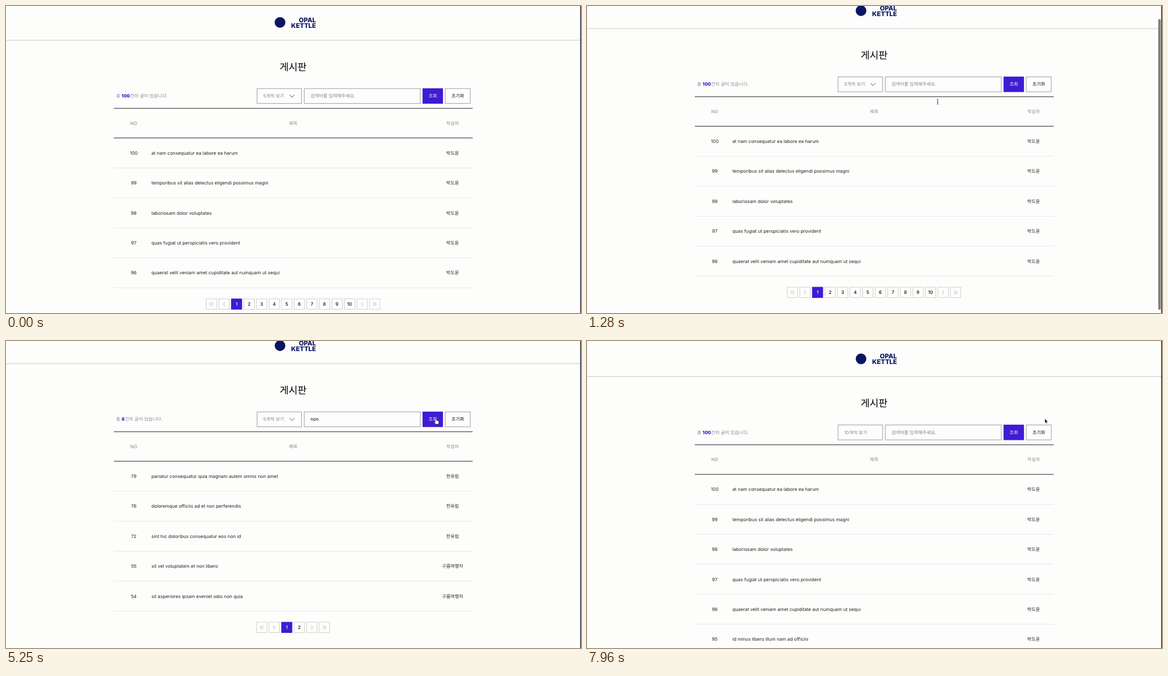
An HTML page that plays this animation: 1024x547 px, repeating every 7990 ms.

```html
<!DOCTYPE html>
<html lang="ko">
<head>
<meta charset="utf-8">
<title>게시판</title>
<style>
html, body { margin: 0; width: 100%; height: 100%; overflow: hidden; background: #fdfdfc; }
svg { display: block; width: 100vw; height: 100vh; }
text { font: 400 8.2px Inter, "Noto Sans CJK KR", "Noto Sans CJK JP", sans-serif; fill: #222; text-rendering: geometricPrecision; white-space: pre; }
.mid { text-anchor: middle; }
.end { text-anchor: end; }
.grey { fill: #888; }
.dark { fill: #111; font-weight: 500; }
.white { fill: #fff; font-weight: 500; }
.title { font-size: 17.5px; fill: #000; }
.brand { font-size: 11.4px; font-weight: 800; fill: #0a1760; }
.count { font-weight: 800; fill: #3f1bd4; }
.author { font-weight: 500; }
.box { fill: none; stroke: #9c9ca2; stroke-width: 1; }
.pager { fill: none; stroke: #cfcfcf; stroke-width: 1; }
.fill { fill: #3f1bd4; }
.rule { fill: #5c5c5c; }
.thin { fill: #e7e7ec; }
.chevron { fill: none; stroke: #858585; stroke-width: 1.1; }
.arrow { fill: none; stroke: #aaa; stroke-width: 0.9; }
</style>
</head>
<body>
<svg viewBox="0 0 1024 547">
  <rect width="1024" height="547" fill="#fdfdfc"/>
  <g id="page">
    <circle cx="488" cy="31.7" r="9.5" fill="#0a1760"/>
    <text class="brand end" x="552" y="31">OPAL</text>
    <text class="brand end" x="552" y="41.2">KETTLE</text>
    <rect y="63" width="1024" height="1" fill="#c9c9cc"/>
    <text class="title mid" x="511.3" y="117.2">게시판</text>
    <text class="grey" x="196" y="165.7">총 <tspan class="count" id="count"></tspan>건의 글이 있습니다.</text>
    <rect class="box" x="447.1" y="149.6" width="79.2" height="26.6"/>
    <text class="grey" id="size" x="458" y="165.7"></text>
    <path class="chevron" id="chevron" d="M504.8 160.7l4.4 4.4 4.4-4.4"/>
    <rect class="box" id="input" x="531.2" y="149.6" width="206.6" height="26.6"/>
    <text id="query" y="165.7"></text>
    <rect id="caret" y="157.8" width="0.9" height="10" fill="#111"/>
    <rect class="fill" x="741.8" y="149.1" width="36.4" height="27.5"/>
    <text class="white mid" x="760" y="165.7">조회</text>
    <rect class="box" x="782.2" y="149.6" width="44.6" height="26.6"/>
    <text class="dark mid" x="804.5" y="165.7">초기화</text>
    <rect class="rule" x="192" y="184.2" width="639" height="1.4"/>
    <rect class="rule" x="192" y="236.9" width="639" height="1.4"/>
    <text class="grey mid" x="227.5" y="214.2">NO</text>
    <text class="grey mid" x="511.3" y="214.2">제목</text>
    <text class="grey mid" x="795.2" y="214.2">작성자</text>
    <g id="list"></g>
  </g>
  <rect id="thumb" x="1017.3" width="4.4" height="518" rx="2.2" fill="#7f7f7f"/>
  <rect x="1022.6" width="1.4" height="547" fill="#26262c"/>
  <g id="cursor">
    <path data-kind="arrow" d="M0 0v8.2l1.9-1.7 1.3 2.8 1.3-.6-1.3-2.7h2.6z" fill="#111" stroke="#fff" stroke-width="0.6"/>
    <path data-kind="beam" d="M-1.7-4.5q1.7 0 1.7 1.1v6.8q0 1.1-1.7 1.1M1.7-4.5q-1.7 0-1.7 1.1v6.8q0 1.1 1.7 1.1M-1 1h2" fill="none" stroke="#444" stroke-width="0.8"/>
    <path data-kind="hand" d="M-1.2.2q.9-.8 1.5.3l1.1 2.4q.8-.6 1.4 0 .8-.5 1.4.2 1-.3 1.4.7l.3 2.6-.9 2.9h-4.4l-3-3.4q-.3-1 .9-.8l1 .6-1.3-4.2q-.1-.9.6-1.3z" fill="#fff" stroke="#333" stroke-width="0.8"/>
  </g>
</svg>
<script>
const LOOP = 7990, MAX_SCROLL = 23.3, ROW = 53.37, PITCH = 22.35;
const SEARCH = 5150, RESET = 7890, FOCUS = 1740;
const AUTHORS = ["박도윤", "한유림", "구름여행자"];
const ALL = [
  [100, "at nam consequatur ea labore ea harum", 0],
  [99, "temporibus sit alias delectus eligendi possimus magni", 0],
  [98, "laboriosam dolor voluptates", 0],
  [97, "quas fugiat ut perspiciatis vero provident", 0],
  [96, "quaerat velit veniam amet cupiditate aut numquam ut sequi", 0],
  [95, "id minus libero illum nam ad officiis", 0]
];
const FOUND = [
  [79, "pariatur consequatur quia magnam autem omnis non amet", 1],
  [76, "doloremque officiis ad et non perferendis", 1],
  [72, "sint hic doloribus consequatur eos non id", 1],
  [55, "sit vel voluptatem et non libero", 2],
  [54, "sit asperiores ipsam eveniet odio non quia", 2]
];
const VIEWS = {
  first: { rows: ALL.slice(0, 5), pages: 10, count: 100, size: 5 },
  found: { rows: FOUND, pages: 2, count: 8, size: 5 },
  reset: { rows: ALL, pages: 0, count: 100, size: 10 }
};
// time, x, y of the pointer
const PATH = [
  [240, 1005, 320], [810, 624.5, 170.5], [1360, 624.5, 170.5], [1680, 600, 140],
  [1840, 600, 140], [2330, 892.5, 135.5], [4159, 892.5, 135.5], [4160, 893, 135],
  [4339, 893, 135], [4340, 961.3, 133.8], [4520, 1014, 126], [4700, 1002, 145],
  [5080, 765, 139], [5520, 765, 139], [5720, 812, 300], [5920, 640, 500],
  [6180, 713, 318], [6310, 713, 318], [6650, 760, 240], [7100, 840, 122],
  [7460, 815.3, 138.2]
];

const $ = id => document.getElementById(id);
const clamp = v => Math.max(0, Math.min(1, v));
const span = (t, a, b) => clamp((t - a) / (b - a));
const smooth = p => p * p * (3 - 2 * p);
const label = (cls, x, y, s) => `<text class="${cls}" x="${x}" y="${y}">${s}</text>`;
const square = (cls, x, y, r) =>
  `<rect class="${cls}" x="${x - r}" y="${y - r}" width="${2 * r}" height="${2 * r}"/>`;

function rowMarkup([no, title, author], i) {
  const y = 267.4 + i * ROW;
  return label("mid", 227.5, y, no) + label("", 259, y, title) +
    label("author mid", 795.2, y, AUTHORS[author]) +
    `<rect class="thin" x="192" y="${290.6 + i * ROW}" width="639" height="1"/>`;
}

function pagerMarkup(pages) {
  const total = pages + 4, y = 533.6;
  let out = "";
  for (let i = 0; i < total; i++) {
    const x = 511.2 + (i - (total - 1) / 2) * PITCH, n = i - 1, on = n === 1;
    out += on ? square("fill", x, y, 9.8) : square("pager", x, y, 9.3);
    if (n >= 1 && n <= pages) {
      out += label(on ? "white mid" : "dark mid", x, y + 3, n);
      continue;
    }
    const dir = n < 1 ? -1 : 1;
    const offsets = i === 0 || i === total - 1 ? [-1.5, 1.5] : [0];
    for (const o of offsets)
      out += `<path class="arrow" d="M${x + o - dir * 1.5} ${y - 3.3}l${dir * 3} 3.3l${-dir * 3} 3.3"/>`;
  }
  return out;
}

let shown;
function showView(name) {
  if (name === shown) return;
  shown = name;
  const v = VIEWS[name];
  $("count").textContent = v.count;
  $("size").textContent = v.size + "개씩 보기";
  $("chevron").style.display = v.size === 5 ? "" : "none";
  $("list").innerHTML = v.rows.map(rowMarkup).join("") + (v.pages ? pagerMarkup(v.pages) : "");
}

function scrollAt(t) {
  if (t < 1040) return 2.5 * (1 - smooth(span(t, 240, 500)));
  if (t >= RESET) return 0;
  return MAX_SCROLL * (1 - (1 - span(t, 1040, 1250)) ** 2);
}

function pointerAt(t) {
  const i = PATH.findIndex(k => k[0] > t);
  if (i < 0) return PATH[PATH.length - 1].slice(1);
  const [a, ax, ay] = PATH[Math.max(0, i - 1)], [b, bx, by] = PATH[i];
  const p = smooth(span(t, a, b));
  return [ax + (bx - ax) * p, ay + (by - ay) * p];
}

function pointerKind(x, y) {
  const within = (a, b) => x >= a && x <= b;
  const bar = y > 149 && y < 177;
  if (bar && within(531, 738)) return "beam";
  const control = within(447, 526) || within(742, 778) || within(782, 827);
  const row = y > 238 && y < 504 && within(192, 831);
  return row || bar && control ? "hand" : "arrow";
}

function drawInput(t) {
  const focus = t >= FOCUS && t < SEARCH;
  const length = t >= RESET ? 0 : [2830, 3410, 3900].filter(k => t >= k).length;
  const x = focus ? 542.8 : 542.2;
  const input = $("input"), query = $("query"), caret = $("caret");
  input.style.stroke = focus ? "#4a27d0" : "";
  input.style.strokeWidth = focus ? 1.4 : "";
  query.textContent = length ? "non".slice(0, length) : "검색어를 입력해주세요.";
  query.style.fill = length ? "#000" : "#808080";
  query.setAttribute("x", x);
  caret.setAttribute("x", x + length * 4.83);
  caret.style.display = focus && length ? "" : "none";
}

function drawPointer(t, scroll) {
  const [x, y] = pointerAt(t);
  // the pointer keeps its shape while the page scrolls beneath it
  const kind = pointerKind(x, y + (t < 1365 ? 0 : scroll));
  const cursor = $("cursor");
  cursor.style.display = t < 240 ? "none" : "";
  cursor.setAttribute("transform", `translate(${x} ${y})`);
  for (const shape of cursor.children)
    shape.style.display = shape.dataset.kind === kind ? "" : "none";
}

function draw(t) {
  const scroll = scrollAt(t);
  showView(t >= RESET ? "reset" : t >= SEARCH ? "found" : "first");
  $("page").setAttribute("transform", `translate(0 ${-scroll})`);
  $("thumb").setAttribute("y", scroll);
  $("thumb").style.opacity = t < 1040 ? 0 : 1 - span(t, 1840, 2080);
  drawInput(t);
  drawPointer(t, scroll);
}

const start = performance.now();
function tick() {
  draw((performance.now() - start) % LOOP);
  requestAnimationFrame(tick);
}
tick();
</script>
</body>
</html>
```
